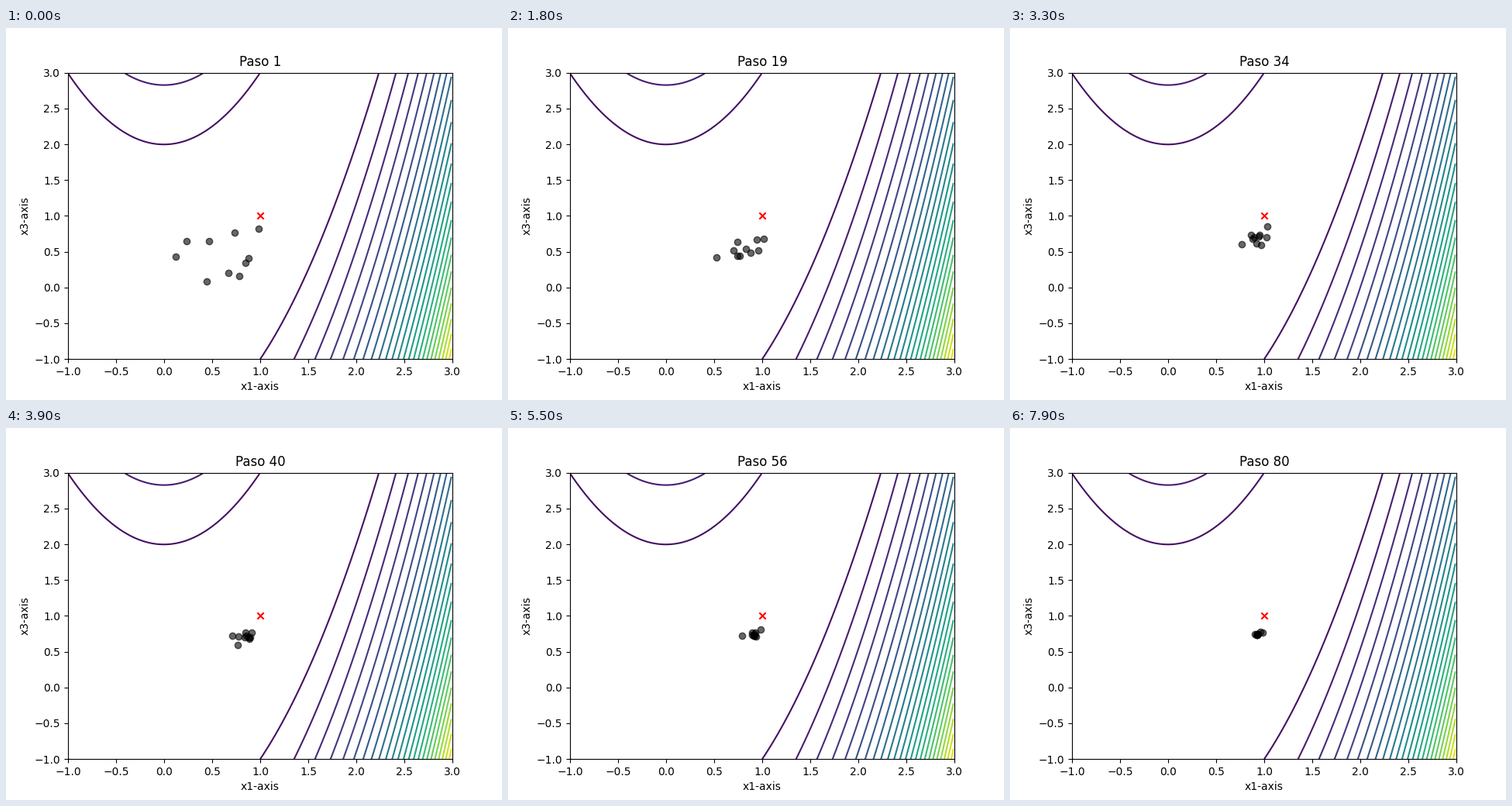
Recreate the animation shown at these times as a matplotlib script. Size 640 px wide and 480 px high, loop 8000 ms.

```python
import numpy as np
import matplotlib.pyplot as plt
from matplotlib.animation import FuncAnimation

STEPS = 80
INTERVAL = 100
GOAL = np.array([0.93, 0.75])

START = np.array([
    (0.12, 0.43), (0.23, 0.65), (0.47, 0.65), (0.73, 0.77), (0.98, 0.82),
    (0.88, 0.41), (0.85, 0.34), (0.67, 0.20), (0.78, 0.16), (0.445, 0.085),
])
MEAN = START.mean(axis=0)

# Each particle swings with its own push, rhythm and damping
rng = np.random.default_rng(7)
PUSH = rng.normal(0, (0.4, 0.32), START.shape)
OMEGA = 2 * np.pi / rng.uniform(11, 20, (len(START), 1))
LIFE = rng.uniform(16, 40, (len(START), 1))


def rosenbrock(x, y):
    return (1 - x) ** 2 + 100 * (y - x ** 2) ** 2


def swarm(step):
    """The swarm's centre glides to the goal while the swings die out."""
    centre = GOAL + (MEAN - GOAL) * np.exp(-step / 18)
    angle = OMEGA * step
    swing = (START - MEAN) * np.cos(angle) + PUSH * np.sin(angle)
    return centre + swing * np.exp(-step / LIFE)


fig, ax = plt.subplots(figsize=(6.4, 4.8), dpi=100)
grid = np.arange(-1, 3, 0.01)
X, Y = np.meshgrid(grid, grid)
ax.contour(X, Y, rosenbrock(X, Y), levels=np.arange(0, 10001, 400), cmap="viridis")
ax.scatter(1, 1, color="red", marker="x")
dots = ax.scatter(*START.T, color="black", alpha=0.6)
ax.set(xlim=(-1, 3), ylim=(-1, 3), xlabel="x1-axis", ylabel="x3-axis")
title = ax.set_title("Paso 1")


def update(step):
    dots.set_offsets(swarm(step))
    title.set_text(f"Paso {step + 1}")
    return dots, title


anim = FuncAnimation(fig, update, frames=STEPS, interval=INTERVAL,
                     repeat=True, repeat_delay=0)
plt.show()
```
